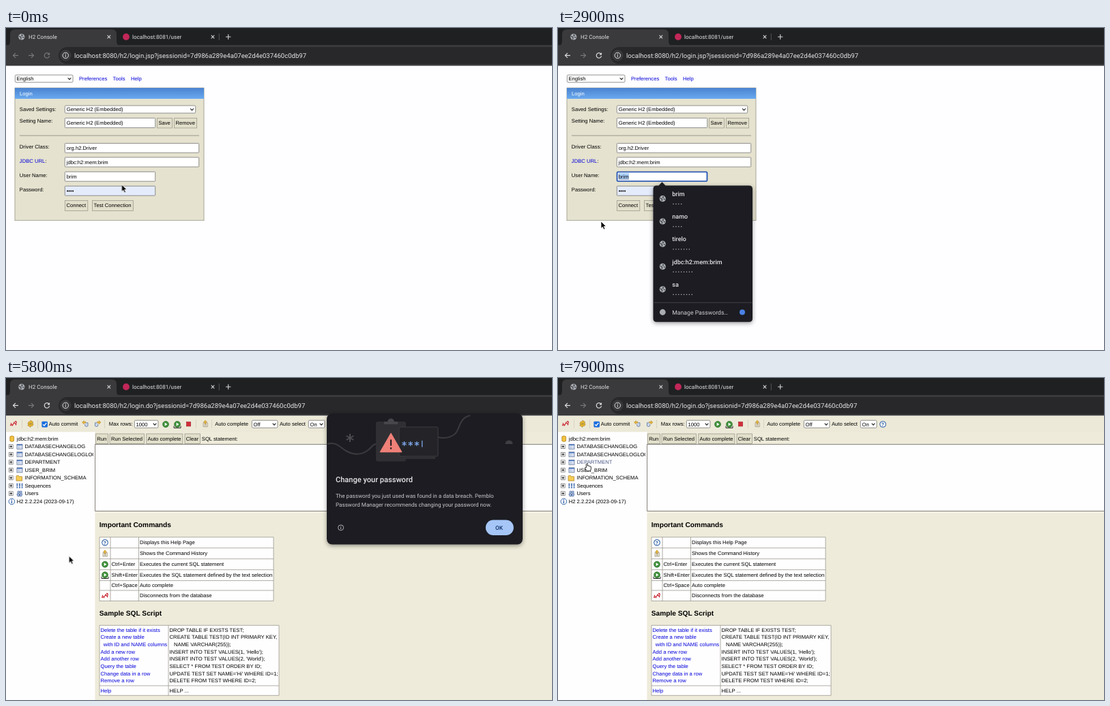
These frames come from a looping animation (800 px wide and 473 px high, 8000 ms). An HTML page:

```html
<!DOCTYPE html>
<html lang="en">
<head>
<meta charset="utf-8">
<title>Database console login</title>
<style>
html, body { margin: 0; width: 100%; height: 100%; overflow: hidden; background: #fefdff; }
svg { display: block; width: 800px; height: 473px; }
text { font: 7.67px "Liberation Sans", Arial, sans-serif; fill: #000; text-rendering: geometricPrecision; white-space: pre; }
.ui text, text.ui { font-family: Roboto, Inter, sans-serif; }
.tab text { font-size: 8.1px; fill: #e3e3e4; }
.url { font-size: 9.57px !important; fill: #e6e6e8; }
.link { fill: #0000d8; }
.head { font-size: 10.18px; font-weight: bold; }
.box { fill: #fff; stroke: #767676; stroke-width: .8; }
.btn { fill: #e2dfcb; stroke: #9d9b8e; stroke-width: .8; }
.grid { fill: #fffeff; stroke: #9a998f; stroke-width: .8; }
.line { fill: none; stroke: #222; stroke-width: 1.1; }
.nav { fill: none; stroke: #dcdcde; stroke-width: 1.2; }
.focus { fill: #fff; stroke: #1f52b5; stroke-width: 1.7; }
.mark { fill: #acd0fb; }
.dots { stroke: #b9b9bd; stroke-width: 1.5; stroke-linecap: round; stroke-dasharray: 0 3.9; }
.names text { font-size: 9px; font-weight: 500; fill: #e4e4e7; }

/* hard switches */
.sw { animation: 8s step-end infinite; }
.wake { animation-name: wake; }
.login { animation-name: login; }
.console { animation-name: console; }
.jsp { animation-name: jsp; }
.do { animation-name: do; }
.jdbc { animation-name: jdbc; }
.jdbcsel { animation-name: jdbcsel; }
.user { animation-name: user; }
.press { animation-name: press; }
.arrow { animation-name: arrow; }
.beam { animation-name: beam; }
.hand { animation-name: hand; }
.hover { animation-name: hover; }
@keyframes wake { 0% { stroke: #77777a } 3.75%, 100% { stroke: #dcdcde } }
@keyframes login { 0% { visibility: visible } 70%, 100% { visibility: hidden } }
@keyframes console { 0% { visibility: hidden } 70%, 100% { visibility: visible } }
@keyframes jsp { 0% { visibility: visible } 60%, 100% { visibility: hidden } }
@keyframes do { 0% { visibility: hidden } 60%, 100% { visibility: visible } }
@keyframes jdbc { 0% { opacity: 0 } 12.5% { opacity: 1 } 28.75%, 100% { opacity: 0 } }
@keyframes jdbcsel { 0% { opacity: 0 } 16.25% { opacity: 1 } 28.75%, 100% { opacity: 0 } }
@keyframes user { 0% { opacity: 0 } 28.75% { opacity: 1 } 38.75%, 100% { opacity: 0 } }
@keyframes press { 0% { opacity: 0 } 57.5%, 100% { opacity: 1 } }
@keyframes arrow { 0% { opacity: 1 } 10% { opacity: 0 } 30% { opacity: 1 } 96.25%, 100% { opacity: 0 } }
@keyframes beam { 0% { opacity: 0 } 10% { opacity: 1 } 30%, 100% { opacity: 0 } }
@keyframes hand { 0% { opacity: 0 } 96.25%, 100% { opacity: 1 } }
@keyframes hover { 0% { fill: #000 } 96.25%, 100% { fill: #4c5a86 } }

.dialog { animation: dialog 8s linear infinite; }
@keyframes dialog {
  0%, 70% { opacity: 0 } 72.4%, 83.75% { opacity: 1 }
  86.2% { opacity: .012 } 87.5%, 100% { opacity: 0 }
}
.cursor { animation: cursor 8s ease-in-out infinite; }
@keyframes cursor {
  0%, 3.75% { transform: translate(169.5px, 230px) }
  11.25%, 13.75% { transform: translate(152px, 197px) }
  18%, 20% { transform: translate(104px, 198px) }
  23.75%, 29% { transform: translate(103.5px, 219px) }
  36%, 39% { transform: translate(63px, 284px) }
  45% { transform: translate(84px, 262px) }
  52.5%, 69% { transform: translate(92.3px, 261.3px) }
  73.75% { transform: translate(92.3px, 261.5px) }
  82.5%, 89% { transform: translate(718px, 219px) }
  97%, 100% { transform: translate(43px, 126px) }
}
</style>
</head>
<body>
<svg viewBox="0 0 800 473">
<defs>
  <linearGradient id="blue" x2="0" y2="1"><stop stop-color="#4b83cf"/><stop offset="1" stop-color="#69a9f0"/></linearGradient>
  <filter id="shade" x="-10%" y="-10%" width="120%" height="125%"><feDropShadow dx="0" dy="2" stdDeviation="3" flood-opacity=".4"/></filter>
  <clipPath id="treeClip"><rect y="79" width="128" height="394"/></clipPath>
  <g id="globe">
    <circle r="4.6" fill="#a9adb2"/>
    <path d="M-3.8-1 L-1.5.2 L-.6 1.6 L-1.4 3.6 M.2-3.6 L1.2-2 L-.4-1 M1.4.4 L3.6 1" fill="none" stroke="#333437" stroke-width="1.1"/>
  </g>
  <path id="x" d="M-2.3-2.3 L2.3 2.3 M2.3-2.3 L-2.3 2.3" stroke="#d5d5d7" stroke-width="1.1"/>
  <path id="chev" d="M-2.3-1.2 L0 1.2 L2.3-1.2" fill="none" stroke="#222" stroke-width="1.2"/>
  <g id="plus"><rect x="-2.9" y="-2.9" width="5.8" height="5.8" fill="#fff" stroke="#777" stroke-width=".8"/><path d="M-1.8 0H1.8 M0-1.8V1.8" stroke="#000" stroke-width=".9"/></g>
  <g id="table"><rect x="-4" y="-3.4" width="8" height="7" fill="#eef4ff" stroke="#5f7295" stroke-width=".8"/><path d="M-4-2.4H4" stroke="#4d76bd" stroke-width="1.6"/><path d="M-4 .2H4 M-4 1.9H4 M-1.2-2V3.6" stroke="#8fa3c5" stroke-width=".5"/></g>
  <g id="run"><circle r="4.5" fill="#3f9139" stroke="#28662a" stroke-width=".6"/><path d="M-1.4-2.5 L2.5 0 L-1.4 2.5Z" fill="#fff"/></g>
  <g id="runsel"><use href="#run"/><path d="M-5 2.5V5.3H5V2.5" fill="none" stroke="#222" stroke-width="1"/></g>
  <g id="unplug" fill="none" stroke="#cb2c37" stroke-width="1.2"><path d="M-4-1 L-1.6 2.8 L1-1.8 L3.6 1.6 L4.3-2.8"/><path d="M-4 3.2V1 M2-3.2 L4.4-3" stroke-width="1.6"/></g>
  <g id="history"><path d="M-3-1.2H3.4V4.6H-3Z" fill="#efe8d4" stroke="#96917f" stroke-width=".7"/><path d="M-1.5 1H2 M-1.5 2.8H2" stroke="#777" stroke-width=".6"/><path d="M0-5 L2.6-2 H1V.4H-1V-2H-2.6Z" fill="#e8b53c" stroke="#a67b1c" stroke-width=".4"/></g>
  <g id="help"><circle r="4.3" fill="#fff" stroke="#3264a8" stroke-width="1.1"/><text class="ui" x="-2" y="2.7" style="font-weight:bold;font-size:7.4px;fill:#2a5aa0">?</text></g>
  <g id="undo"><path d="M-4.5-1.8 L-1.8-4.4V-2.8H1V-.7H-1.8V.8Z" fill="#e7b437" stroke="#9c7523" stroke-width=".4"/><path d="M1.2-1.2H4V3.2C4 4.6-.2 4.6-.2 3.2V.8" fill="#cbd8ef" stroke="#49658f" stroke-width=".7"/></g>
</defs>

<rect width="800" height="473" fill="#fefdff"/>

<!-- browser frame -->
<g class="ui">
  <rect width="800" height="26" fill="#1f2022"/>
  <path d="M0 26C5 26 6 23 6 19V9Q6 2 13 2H155Q162 2 162 9V19C162 23 163 26 168 26Z" fill="#3a3a3c"/>
  <rect y="25" width="800" height="30.5" fill="#3a3a3c"/>
  <rect x="77" y="28" width="750" height="25" rx="12.5" fill="#28282a"/>
  <use href="#globe" x="22.8" y="13"/>
  <use href="#x" x="150.8" y="13"/>
  <circle cx="176" cy="13" r="4.9" fill="#c22758"/>
  <use href="#x" x="303" y="13"/>
  <path d="M312.3 8V18" stroke="#56565a"/>
  <path d="M322 13H329.4 M325.7 9.3V16.7" stroke="#d5d5d7" stroke-width="1.1"/>
  <g class="tab"><text x="33" y="15.8">H2 Console</text><text x="185" y="15.8">localhost:8081/user</text></g>
  <path class="nav sw wake" d="M18 40.3H10.6 M14 36.8 L10.5 40.3 L14 43.8"/>
  <path class="nav" style="stroke:#77777a" d="M33 40.3H40.4 M37 36.8 L40.5 40.3 L37 43.8"/>
  <path class="nav sw wake" d="M63 38.2A3.7 3.7 0 1 0 63.6 41.2 M63.5 36.4V38.9H61"/>
  <circle cx="87.3" cy="40.3" r="8.2" fill="#39393b"/>
  <circle cx="87.3" cy="40.3" r="4.2" fill="none" stroke="#e3e3e5"/>
  <path d="M87.3 39.8V42.6 M87.3 37.8V38.9" stroke="#e3e3e5" stroke-width="1.1"/>
  <text class="url sw jsp" x="100" y="43.7">localhost:8080/h2/login.jsp?jsessionid=7d986a289e4a07ee2d4e037460c0db97</text>
  <text class="url sw do" x="100" y="43.7">localhost:8080/h2/login.do?jsessionid=7d986a289e4a07ee2d4e037460c0db97</text>
</g>

<!-- login page -->
<g class="sw login">
  <rect class="box" x="13.4" y="69" width="84.6" height="10.8" rx="1.5"/>
  <use href="#chev" x="93" y="74.5"/>
  <text x="15.5" y="77.1">English</text>
  <g class="link"><text class="link" x="107" y="77.1">Preferences</text><text class="link" x="156.6" y="77.1">Tools</text><text class="link" x="183" y="77.1">Help</text></g>

  <rect x="13" y="88" width="277" height="194.7" fill="#e5e2cf" stroke="#989686" stroke-width=".8"/>
  <rect x="13" y="88" width="277" height="16" fill="url(#blue)"/>
  <text x="20" y="98.7" style="fill:#fff">Login</text>
  <text x="19.8" y="121.6">Saved Settings:</text>
  <text x="19.8" y="139.4">Setting Name:</text>
  <text x="19.8" y="177.4">Driver Class:</text>
  <text x="19.8" y="197.8"><tspan class="link">JDBC URL</tspan>:</text>
  <text x="19.8" y="218.8">User Name:</text>
  <text x="19.8" y="239.8">Password:</text>
  <path d="M20 158H283" stroke="#99978c" stroke-width="1"/>

  <g class="box">
    <rect x="86.3" y="114" width="191.4" height="11" rx="1.5"/>
    <rect x="86.3" y="132.3" width="132.4" height="14.2" rx="1"/>
    <rect x="86.3" y="169.4" width="196.4" height="13.8" rx="1"/>
    <rect x="86.3" y="190" width="196.4" height="14" rx="1"/>
    <rect x="86.3" y="211.2" width="132.4" height="14" rx="1"/>
    <rect x="86.3" y="232.2" width="132.4" height="14" rx="1" fill="#e4ebfb"/>
  </g>
  <use href="#chev" x="272.5" y="119.6"/>
  <g class="btn">
    <rect x="221.4" y="132.3" width="22.2" height="14.6"/>
    <rect x="246.4" y="132.3" width="33.2" height="14.6"/>
    <rect x="86.4" y="253.4" width="33.4" height="15"/>
    <rect x="126.5" y="253.4" width="59.8" height="15"/>
  </g>
  <rect class="sw press" x="86.4" y="253.4" width="33.4" height="15" fill="none" stroke="#333" stroke-width="1"/>
  <g class="sw jdbc"><rect class="focus" x="86.6" y="190.3" width="195.8" height="13.6" rx="1.2"/></g>
  <rect class="mark sw jdbcsel" x="88.6" y="192.2" width="61.4" height="9.4"/>
  <path class="sw jdbc" d="M89 201.2H149.5" stroke="#7a6b76" stroke-width=".9" stroke-dasharray="1 .8"/>
  <g class="sw user"><rect class="focus" x="86.6" y="211.5" width="131.8" height="13.5" rx="1.2"/><rect class="mark" x="88.6" y="213.2" width="15.4" height="9.6"/><path d="M89 222.3H104" stroke="#7a6b76" stroke-width=".9" stroke-dasharray="1 .8"/></g>

  <text x="88.7" y="122.3">Generic H2 (Embedded)</text>
  <text x="88.7" y="142">Generic H2 (Embedded)</text>
  <text x="88.7" y="179">org.h2.Driver</text>
  <text x="88.7" y="199.7">jdbc:h2:mem:brim</text>
  <text x="88.7" y="220.8">brim</text>
  <text x="88.7" y="241.8">••••</text>
  <text x="223.4" y="142.2">Save</text>
  <text x="248.4" y="142.2">Remove</text>
  <text x="88.5" y="263.4">Connect</text>
  <text x="128.6" y="263.4">Test Connection</text>

  <!-- saved password list -->
  <g class="sw user">
    <g class="ui names">
      <path d="M144 231.5H147.5L152.5 226.3L157.5 231.5H280Q285 231.5 285 236.5V427Q285 431.8 280 431.8H144.5Q139.5 431.8 139.5 427V236.5Q139.5 231.5 144.5 231.5Z" fill="#1d1d20" filter="url(#shade)"/>
      <use href="#globe" x="153.3" y="250.7"/><use href="#globe" x="153.3" y="284"/><use href="#globe" x="153.3" y="317.2"/><use href="#globe" x="153.3" y="350.4"/><use href="#globe" x="153.3" y="383.8"/>
      <text x="167.3" y="247">brim</text>
      <text x="167.3" y="280.2">namo</text>
      <text x="167.3" y="313.4">tirelo</text>
      <text x="167.3" y="346.6">jdbc:h2:mem:brim</text>
      <text x="167.3" y="379.9">sa</text>
      <path class="dots" d="M169 258.6h12 M169 291.8h12 M169 325h24 M169 358.2h28 M169 391.6h28"/>
      <path d="M139.5 403.4H285" stroke="#4a4a4e" stroke-width=".8"/>
      <circle cx="153.3" cy="417.5" r="4.4" fill="#a9adb2"/>
      <text x="167.3" y="420.7" style="font-size:8.66px;font-weight:400;fill:#d0d0d4">Manage Passwords…</text>
      <circle cx="270" cy="417.5" r="4" fill="#4a82e4"/>
    </g>
  </g>
</g>

<!-- console page -->
<g class="sw console">
  <rect y="55.5" width="800" height="24" fill="#ece9d8"/>
  <rect x="130" y="79" width="670" height="394" fill="#eeebda"/>
  <path d="M130.3 79V473 M130 197.8H800" stroke="#f8f6ec" stroke-width="1"/>
  <path d="M23.5 61V74 M46.5 61V74 M144.5 61V74 M278.5 61V74 M301.5 61V74" stroke="#d2cfbf" stroke-width=".8"/>

  <use href="#unplug" x="11" y="67"/>
  <g fill="#edb92f" stroke="#8f6a15" stroke-width=".5"><path d="M32 67.5Q32 63.5 36 63.8V62L40 65L36 67.6V66Q34 66 34 68.5Z"/><path d="M40 67Q40 71.2 36 70.6V72.3L31.6 69.6L36 67V68.6Q38 68.4 38 66.6Z"/></g>
  <rect x="52.4" y="63.8" width="8.6" height="8.6" rx="1.4" fill="#1b6fdd"/>
  <path d="M54.2 68.2L56 70L59.4 65.8" fill="none" stroke="#fff" stroke-width="1.3"/>
  <text x="62.8" y="70.4">Auto commit</text>
  <use href="#undo" x="116" y="67"/>
  <use href="#undo" x="0" y="0" transform="matrix(-1 0 0 1 134.5 67)"/>
  <text x="150.8" y="70.4">Max rows:</text>
  <g class="box"><rect x="188.3" y="62.2" width="34.6" height="11" rx="1.5"/><rect x="360.3" y="62.2" width="37.6" height="11" rx="1.5"/><rect x="443.3" y="62.2" width="23.6" height="11" rx="1.5"/></g>
  <use href="#chev" x="218" y="67.9"/><use href="#chev" x="393" y="67.9"/><use href="#chev" x="462" y="67.9"/>
  <text x="190.6" y="70.5">1000</text>
  <text x="362.6" y="70.5">Off</text>
  <text x="445.6" y="70.5">On</text>
  <use href="#run" x="234" y="68"/><use href="#runsel" x="251" y="68"/>
  <rect x="264.3" y="64.5" width="6.4" height="6.4" fill="#d12e3a" stroke="#9e1f2a" stroke-width=".6"/>
  <use href="#history" x="292" y="67"/>
  <text x="306.2" y="70.4">Auto complete</text>
  <text x="401" y="70.4">Auto select</text>
  <use href="#help" x="476" y="68"/>

  <!-- schema tree -->
  <rect y="79.5" width="130" height="394" fill="#fffeff"/>
  <g clip-path="url(#treeClip)">
    <path d="M5.8 86V92.5Q8.7 94.6 11.6 92.5V86Q8.7 84 5.8 86Z" fill="#f3c23f" stroke="#a87a17" stroke-width=".7"/>
    <use href="#plus" x="7.3" y="100.7"/><use href="#plus" x="7.3" y="112.2"/><use href="#plus" x="7.3" y="123.7"/><use href="#plus" x="7.3" y="135.2"/><use href="#plus" x="7.3" y="146.7"/><use href="#plus" x="7.3" y="158.2"/><use href="#plus" x="7.3" y="169.7"/>
    <use href="#table" x="20" y="100.7"/><use href="#table" x="20" y="112.2"/><use href="#table" x="20" y="123.7"/><use href="#table" x="20" y="135.2"/>
    <path d="M15 144.2V151H23.6V144.8H19.4L18.4 143.4H15.6Z" fill="#f6cd55" stroke="#a87d1e" stroke-width=".7"/>
    <path d="M15.4 155.8H25 M15.4 158.4H25 M15.4 161H25" stroke="#2d5fa8" stroke-width="1.7" stroke-dasharray="2 1.6"/>
    <g fill="#b9cdee" stroke="#395a92" stroke-width=".8"><circle cx="18.4" cy="167.6" r="1.5"/><circle cx="21.8" cy="167.6" r="1.5"/><path d="M16 170h3.4v3.6h-2.4z M20.4 170h3.4l-1 3.6h-2.4z"/></g>
    <circle cx="8.4" cy="181.4" r="4.3" fill="#fff" stroke="#3264a8" stroke-width="1"/>
    <path d="M8.4 180.6V184 M8.4 178.4V179.7" stroke="#2a5aa0" stroke-width="1.4"/>
    <text x="15.7" y="91.5">jdbc:h2:mem:brim</text>
    <text y="103.4"><tspan x="27.5">DATABASECHANGELOG</tspan><tspan x="27.5" dy="11.45">DATABASECHANGELOGLOCK</tspan><tspan class="sw hover" x="27.5" dy="11.45">DEPARTMENT</tspan><tspan x="27.5" dy="11.45">USER_BRIM</tspan><tspan x="27.5" dy="11.45">INFORMATION_SCHEMA</tspan><tspan x="27.5" dy="11.45">Sequences</tspan><tspan x="27.5" dy="11.45">Users</tspan></text>
    <text x="15.7" y="183.8">H2 2.2.224 (2023-09-17)</text>
  </g>

  <!-- query area -->
  <g class="btn">
    <rect x="131.4" y="82" width="18" height="14.4"/><rect x="152" y="82" width="50.4" height="14.4"/>
    <rect x="205.8" y="82" width="53" height="14.4"/><rect x="262" y="82" width="22.4" height="14.4"/>
  </g>
  <text x="133.3" y="91.6">Run</text><text x="154" y="91.6">Run Selected</text><text x="207.6" y="91.6">Auto complete</text><text x="263.8" y="91.6">Clear</text>
  <text x="286.8" y="91.6">SQL statement:</text>
  <rect x="130.6" y="97.4" width="680" height="98" fill="#fffeff" stroke="#77766f" stroke-width=".9"/>

  <!-- help tables -->
  <text class="head" x="136.8" y="219.3">Important Commands</text>
  <path class="grid" d="M137 233.8H392V327.5H137Z M137 249.7H392 M137 265.7H392 M137 281.7H392 M137 297.6H392 M137 312H392 M153 233.8V327.5 M194.5 233.8V327.5"/>
  <use href="#help" x="145" y="241.8"/><use href="#history" x="145" y="257.6"/><use href="#run" x="145" y="273.7"/><use href="#runsel" x="145" y="289.2"/><use href="#unplug" x="145" y="319.8"/>
  <text x="154.6" y="276.4">Ctrl+Enter</text><text x="154.6" y="292.3">Shift+Enter</text><text x="154.6" y="307.4">Ctrl+Space</text>
  <text x="196" y="244.4">Displays this Help Page</text>
  <text x="196" y="260.4">Shows the Command History</text>
  <text x="196" y="276.4">Executes the current SQL statement</text>
  <text x="196" y="292.3">Executes the SQL statement defined by the text selection</text>
  <text x="196" y="307.4">Auto complete</text>
  <text x="196" y="322.4">Disconnects from the database</text>

  <text class="head" x="136.8" y="348.6">Sample SQL Script</text>
  <path class="grid" d="M137 363.3H400V466.3H137Z M137 452H400 M238 363.3V466.3"/>
  <text class="link" y="372.8"><tspan x="138.5">Delete the table if it exists</tspan><tspan x="138.5" dy="10.65">Create a new table</tspan><tspan x="142.8" dy="10.65">with ID and NAME columns</tspan><tspan x="138.5" dy="10.65">Add a new row</tspan><tspan x="138.5" dy="10.65">Add another row</tspan><tspan x="138.5" dy="10.65">Query the table</tspan><tspan x="138.5" dy="10.65">Change data in a row</tspan><tspan x="138.5" dy="10.65">Remove a row</tspan><tspan x="138.5" dy="14.2">Help</tspan></text>
  <text y="372.8"><tspan x="239.6">DROP TABLE IF EXISTS TEST;</tspan><tspan x="239.6" dy="10.65">CREATE TABLE TEST(ID INT PRIMARY KEY,</tspan><tspan x="246" dy="10.65">NAME VARCHAR(255));</tspan><tspan x="239.6" dy="10.65">INSERT INTO TEST VALUES(1, 'Hello');</tspan><tspan x="239.6" dy="10.65">INSERT INTO TEST VALUES(2, 'World');</tspan><tspan x="239.6" dy="10.65">SELECT * FROM TEST ORDER BY ID;</tspan><tspan x="239.6" dy="10.65">UPDATE TEST SET NAME='Hi' WHERE ID=1;</tspan><tspan x="239.6" dy="10.65">DELETE FROM TEST WHERE ID=2;</tspan><tspan x="239.6" dy="14.2">HELP ...</tspan></text>
</g>

<!-- password warning -->
<g class="ui dialog">
  <rect x="470" y="52" width="287" height="192.6" rx="8" fill="#1f1f22" filter="url(#shade)"/>
  <g fill="none" stroke="#3b3b3f" stroke-width="2">
    <path d="M471 97C485 93 490 103 500 108S520 113 529 107S536 97 543 97"/>
    <path d="M633 87C645 90 658 86 662 76S668 58 680 55"/>
    <path d="M504 82V94 M498.8 85L509.2 91 M509.2 85L498.8 91" stroke="#4c4c51"/>
  </g>
  <path d="M731.5 97A5.5 5.5 0 0 1 742.5 97Z" fill="#3e3e43"/>
  <rect x="542" y="64" width="44" height="58.5" rx="3" fill="#303034"/>
  <path d="M554 68V64H559Q560 59.5 564 59.5T569 64H574V68Z" fill="#46464b"/>
  <rect x="576" y="72" width="57" height="43" rx="2" fill="#242428" stroke="#3c3c41"/>
  <path d="M586 115H629V119H586Z" fill="#303034"/>
  <path d="M564 81.5L579.5 108.5H548.5Z" fill="#ee8078" stroke="#ee8078" stroke-width="1.5" stroke-linejoin="round"/>
  <path d="M564 90.5V99.5 M564 102V104.4" stroke="#2a2022" stroke-width="2.2"/>
  <path id="star" d="M583.5 93V100 M580.4 94.8L586.6 98.2 M586.6 94.8L580.4 98.2" stroke="#83aef5" stroke-width="1.1"/>
  <use href="#star" x="9.2"/><use href="#star" x="18.4"/>
  <path d="M609.7 92V101.5" stroke="#83aef5" stroke-width="1.2"/>
  <text x="483" y="153.3" style="font-size:11.05px;font-weight:500;fill:#e7e7ea">Change your password</text>
  <g style="--s:8.12px">
    <text x="483" y="176.4" style="font-size:var(--s);fill:#c9c9cd">The password you just used was found in a data breach. Pemblo</text>
    <text x="483" y="189.1" style="font-size:var(--s);fill:#c9c9cd">Password Manager recommends changing your password now.</text>
  </g>
  <circle cx="490.6" cy="219.8" r="4" fill="none" stroke="#bdbdc1" stroke-width=".9"/>
  <path d="M490.6 219.3V222 M490.6 217.4V218.4" stroke="#bdbdc1"/>
  <rect x="702.8" y="208.5" width="41" height="22.6" rx="11.3" fill="#a6c6f8"/>
  <text x="717" y="222.8" style="font-size:8.3px;font-weight:500;fill:#0d2f66">OK</text>
</g>

<!-- pointer -->
<g class="cursor">
  <path class="sw arrow" d="M0 0V10.4L2.4 8.2L4.1 12L6 11.2L4.3 7.5H7.5Z" fill="#000" stroke="#fff" stroke-width=".8" stroke-linejoin="round"/>
  <g class="sw beam" fill="none"><path d="M-2-5Q0-5 0-3.6Q0-5 2-5 M0-3.6V3.8 M-2 5Q0 5 0 3.8Q0 5 2 5 M-1.2 1.4H1.2" stroke="#fff" stroke-width="2"/><path d="M-2-5Q0-5 0-3.6Q0-5 2-5 M0-3.6V3.8 M-2 5Q0 5 0 3.8Q0 5 2 5 M-1.2 1.4H1.2" stroke="#111" stroke-width=".9"/></g>
  <path class="sw hand" d="M-1.6 5.6V.2Q-.6-1.2.4.2V3.2Q1.6 2.2 2.2 3.4Q3.4 2.6 3.9 3.9Q5.4 3.4 5.4 5.2V7.4L4.4 10.6H-.8L-3.4 6.6Q-3.6 4.6-1.6 5.6Z" fill="#fff" stroke="#111" stroke-width=".9" stroke-linejoin="round"/>
</g>
</svg>
</body>
</html>
```
